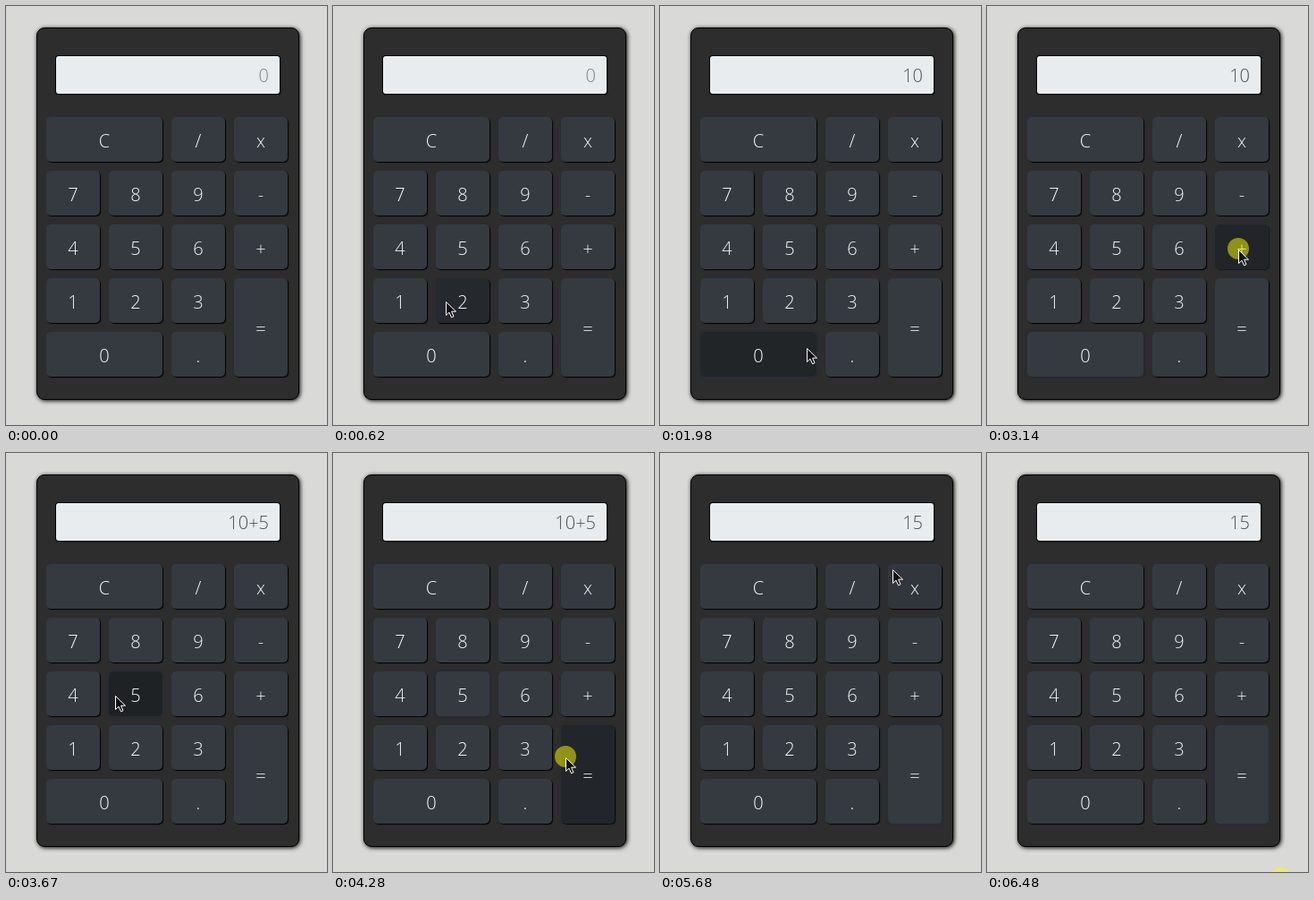
Write an HTML page that moves like this. It is 359 by 468 pixels and loops after 6540 ms.

```html
<!DOCTYPE html>
<html lang="en">
<head>
<meta charset="utf-8">
<title>Calculator</title>
<style>
  html, body { margin: 0; width: 100%; height: 100%; overflow: hidden; background: #d9d9d7; }
  body { position: relative; font: 350 20px "Open Sans", "Noto Sans", sans-serif; }
  #calc, #display, #keys, #pointer { position: absolute; box-sizing: border-box; }
  #calc {
    left: 34px; top: 24px; width: 294px; height: 416px;
    background: #2d2d2d; border: 1px solid #000; border-radius: 9px;
    box-shadow: 1px 1px 5px #000;
  }
  #display {
    left: 56px; top: 56px; width: 250px; height: 42px; padding-right: 12px;
    line-height: 44px; text-align: right; color: #495057;
    background: #e9ecef; border-radius: 3px; box-shadow: 0 0 0 1px #000, 1px 1px 2px #000;
  }
  #display.empty { color: #7b868b; }
  #keys {
    left: 45px; top: 124px; display: grid; gap: 10px;
    grid-template-columns: repeat(4, 60px); grid-auto-rows: 50px;
  }
  .key {
    display: grid; place-items: center; padding-top: 2px; box-sizing: border-box;
    color: #f8f9fa; border-radius: 5px;
  }
  .wide { grid-column: span 2; }
  .tall { grid-row: span 2; }
  #pointer { left: 0; top: 0; overflow: visible; }
</style>
</head>
<body>
<div id="calc"></div>
<div id="display"></div>
<div id="keys"></div>
<svg id="pointer" width="1" height="1">
  <circle r="12" fill="#ff0" fill-opacity=".5"/>
  <path d="M.5 1.5V16.5L4 13.2L6.5 18.8L9 17.7L6.6 12.2H11.5Z" fill="#111" stroke="#fff"/>
</svg>
<script>
const LOOP = 6540;
const FADE = 150;
const PRESS = 160;

// Where the pointer rests; bend curves the way that leads there
const stops = [
  { x: 270, y: 470, arrive: 0, leave: 0 },
  { x: 78, y: 319, arrive: 850, leave: 1190, bend: .3, press: 950, key: '1' },
  { x: 164, y: 381, arrive: 1600, leave: 2050, bend: .2, press: 1740, key: '0' },
  { x: 281, y: 271, arrive: 2960, leave: 3230, bend: .4, press: 3100, key: '+' },
  { x: 122, y: 270, arrive: 3480, leave: 3700, bend: 0, press: 3500, key: '5' },
  { x: 260, y: 339, arrive: 4180, leave: 4940, bend: 0, press: 4270, key: '=' },
  { x: 257, y: 112, arrive: 5540, leave: 5590, bend: -.06 },
  { x: 328, y: 475, arrive: 6280, leave: LOOP, bend: 0, press: 6470 }
];
const clicks = stops.filter(s => s.press);

const display = document.getElementById('display');
const pointer = document.getElementById('pointer');
const halo = pointer.querySelector('circle');

const keys = [...'C/x789-456+123=0.'].map(label => {
  const el = document.createElement('div');
  el.className = 'key' + ('C0'.includes(label) ? ' wide' : label === '=' ? ' tall' : '');
  el.textContent = label;
  document.getElementById('keys').append(el);
  return { label, el };
});
for (const k of keys) k.box = k.el.getBoundingClientRect();

const lerp = (a, b, u) => a + (b - a) * u;
const ease = u => u * u * (3 - 2 * u);

function tip(t) {
  const i = stops.findIndex(s => t <= s.leave);
  const b = stops[i], a = stops[i - 1];
  if (!a || t >= b.arrive) return b;
  const u = ease((t - a.leave) / (b.arrive - a.leave));
  const dx = b.x - a.x, dy = b.y - a.y, bow = 2 * u * (1 - u) * b.bend;
  return { x: a.x + dx * u - dy * bow, y: a.y + dy * u + dx * bow };
}

const over = (box, { x, y }) =>
  x >= box.left && x < box.right && y >= box.top && y < box.bottom;

function stateAt(t) {
  const last = clicks.filter(c => t >= c.press).pop();
  return {
    at: tip(t),
    focus: clicks.filter(c => c.key && t >= c.press).pop()?.key,
    down: last && t < last.press + PRESS ? last : null
  };
}

function readout(t) {
  const typed = clicks.filter(c => c.key && t >= c.press + PRESS).map(c => c.key).join('');
  if (!typed.endsWith('=')) return typed;
  return String(typed.slice(0, -1).split('+').reduce((sum, n) => sum + Number(n), 0));
}

function paint(key, recent) {
  // Averaging the last moments gives each key its fade
  const share = test => recent.filter(test).length / recent.length;
  const hover = share(r => over(key.box, r.at));
  const active = share(r => r.down?.key === key.label);
  const focus = share(r => r.focus === key.label);
  const tone = (rest, dark, pressed) => lerp(lerp(rest, dark, hover), pressed, active);
  key.el.style.background = `rgb(${tone(52, 35, 29)},${tone(58, 39, 33)},${tone(64, 43, 36)})`;
  key.el.style.boxShadow =
    `0 0 0 3px rgba(41,44,49,${focus}), 1px 1px 1px rgba(0,0,0,${1 - focus})`;
}

function draw(t) {
  const recent = Array.from({ length: 10 }, (_, i) => stateAt(Math.max(0, t - i * FADE / 10)));
  for (const k of keys) paint(k, recent);

  const text = readout(t);
  display.textContent = text || '0';
  display.classList.toggle('empty', !text);

  const { at, down } = recent[0];
  pointer.style.transform = `translate(${Math.round(at.x)}px,${Math.round(at.y)}px)`;
  halo.style.display = down ? '' : 'none';
}

const start = performance.now();
function tick() {
  draw((performance.now() - start) % LOOP);
  requestAnimationFrame(tick);
}
tick();
</script>
</body>
</html>
```
